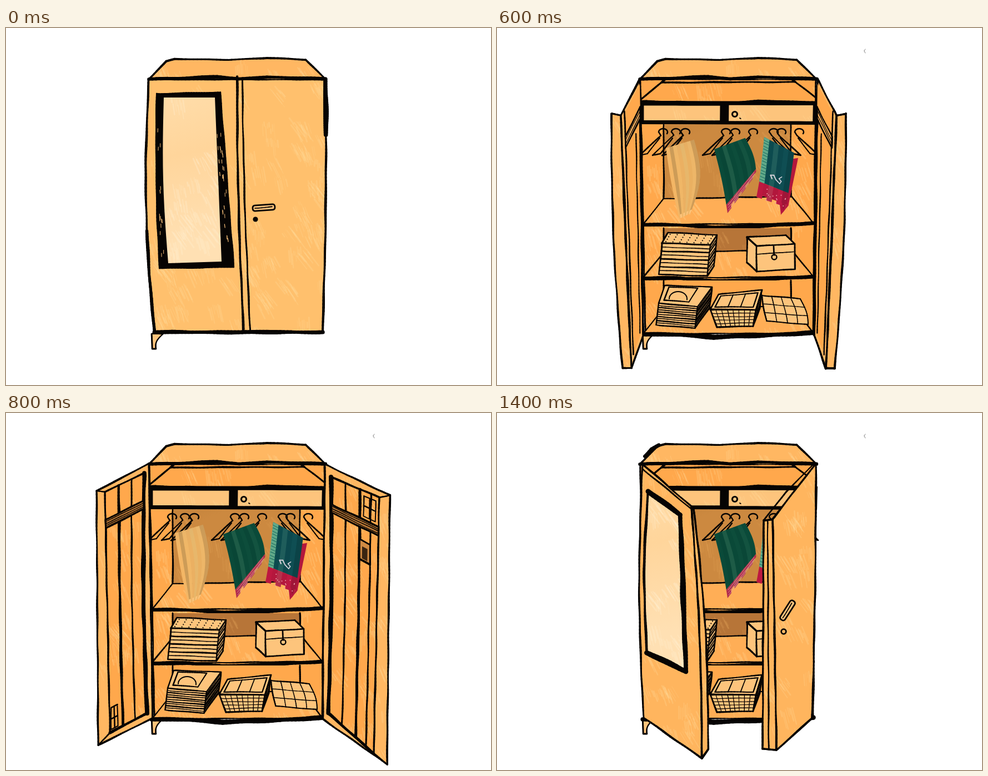
These frames come from a looping animation (873x642 px, 1500 ms). An HTML page with a canvas:

```html
<!DOCTYPE html>
<html>
<head>
<meta charset="utf-8">
<title>Wardrobe</title>
<style>
html, body { margin: 0; width: 100%; height: 100%; overflow: hidden; background: #fff; }
canvas { display: block; }
</style>
</head>
<body>
<canvas id="stage" width="873" height="642"></canvas>
<script>
const c = document.getElementById('stage').getContext('2d');
c.lineCap = c.lineJoin = 'round';
const BLACK = '#060403', PALE = '#fdc47c', WOOD = '#ffb762', INNER = '#ffa84c', BAR = '#b97735';

const mix = (a, b, t) => a + (b - a) * t;
const points = s => typeof s === 'string' ? s.split(' ').map(p => p.split(',').map(Number)) : s;

function random(seed) {
  return () => (seed = (seed * 16807 + 11) % 2147483647) / 2147483647;
}

// A four-cornered patch whose u = 0 and u = 1 sides bow sideways by l and r.
const quad = (s, l = 0, r = 0) => Object.assign(points(s), { l, r });
const flip = q => quad(q.map(([x, y]) => [834 - x, y]), -q.l || 0, -q.r || 0);

function at(q, u, v) {
  const [x, y] = [0, 1].map(k => mix(mix(q[0][k], q[1][k], u), mix(q[3][k], q[2][k], u), v));
  return [x + mix(q.l, q.r, u) * Math.sin(Math.PI * v), y];
}

const run = (q, u0, v0, u1, v1) =>
  Array.from({ length: 13 }, (_, i) => at(q, mix(u0, u1, i / 12), mix(v0, v1, i / 12)));
const rim = q => [...run(q, 0, 0, 1, 0), ...run(q, 1, 0, 1, 1), ...run(q, 1, 1, 0, 1), ...run(q, 0, 1, 0, 0)];
const inset = (q, u0, v0, u1, v1) => quad([at(q, u0, v0), at(q, u1, v0), at(q, u1, v1), at(q, u0, v1)]);

function trace(pts) {
  c.beginPath();
  points(pts).forEach(([x, y]) => c.lineTo(x, y));
  c.closePath();
}

function fill(color, pts) {
  trace(pts);
  c.fillStyle = color;
  c.fill();
}

// Hand-drawn line: slight wobble and changing pressure.
function ink(w, pts, color = BLACK) {
  const p = points(pts), seed = p[0][0] + p[0][1] * 3;
  const wave = k => (Math.sin(k * .09 + seed) + Math.sin(k * .037 + seed * 2)) / 2;
  let walked = 0, [px, py] = p[0];
  c.strokeStyle = color;
  for (let i = 1; i < p.length; i++) {
    const [ax, ay] = p[i - 1], [bx, by] = p[i], len = Math.hypot(bx - ax, by - ay);
    const n = Math.ceil(len / 7);
    for (let j = 1; j <= n; j++) {
      walked += len / n;
      const x = mix(ax, bx, j / n) + wave(walked) * .5, y = mix(ay, by, j / n) + wave(walked + 40) * .5;
      c.lineWidth = w * (1 + .2 * wave(walked * .8 + 9));
      c.beginPath();
      c.moveTo(px, py);
      c.lineTo(x, y);
      c.stroke();
      [px, py] = [x, y];
    }
  }
}

const rule = (q, u, w, v0 = 0, v1 = 1) => ink(w, run(q, u, v0, u, v1));

function shape(color, w, q) {
  fill(color, rim(q));
  ink(w, rim(q));
}

function grid(q, cols, rows, w) {
  for (let i = 1; i < cols; i++) rule(q, i / cols, w);
  for (let i = 1; i < rows; i++) ink(w, run(q, 0, i / rows, 1, i / rows));
}

function dot(x, y, r, color = BLACK) {
  c.beginPath();
  c.arc(x, y, r, 0, 7);
  c.fillStyle = color;
  c.fill();
}

function arc(x, y, rx, ry, from, to, w) {
  c.beginPath();
  c.ellipse(x, y, rx, ry, 0, from, to);
  c.lineWidth = w;
  c.strokeStyle = BLACK;
  c.stroke();
}

// Dry-brush patches, one for every 1500 square pixels.
function brush(pts, color = 'rgba(255,222,160,.24)') {
  const xs = pts.map(p => p[0]), ys = pts.map(p => p[1]);
  const x0 = Math.min(...xs), y0 = Math.min(...ys), w = Math.max(...xs) - x0, h = Math.max(...ys) - y0;
  const r = random(Math.round(x0 * 7 + y0 * 13));
  c.save();
  trace(pts);
  c.clip();
  c.strokeStyle = color;
  for (let i = 0; i < w * h / 1500; i++) {
    const x = x0 + r() * w, y = y0 + r() * h, slant = r() * .8;
    for (let j = 0; j < 8; j++) {
      const sx = x + j * 3, sy = y + r() * 14, len = 6 + r() * 24;
      c.lineWidth = .6 + r() * 2.4;
      c.beginPath();
      c.moveTo(sx, sy);
      c.lineTo(sx + len * slant, sy + len);
      c.stroke();
    }
  }
  c.restore();
}

function wood(color, w, q) {
  fill(color, rim(q));
  brush(rim(q));
  if (w) ink(w, rim(q));
}

function gradient(y0, y1, ...colors) {
  const g = c.createLinearGradient(0, y0, 60, y1);
  colors.forEach((s, i) => g.addColorStop(i / (colors.length - 1), s));
  return g;
}

function glass(q) {
  fill(gradient(120, 440, '#ffe0b0', '#ffd59b', '#ffe0b3'), rim(q));
  brush(rim(q), 'rgba(255,238,210,.3)');
}

function handle(x, y, angle) {
  c.save();
  c.translate(x, y);
  c.rotate(angle);
  c.beginPath();
  c.roundRect(-20, -5, 40, 10, 4);
  c.fillStyle = PALE;
  c.fill();
  c.lineWidth = 2.8;
  c.strokeStyle = BLACK;
  c.stroke();
  ink(1.8, '-16,0 15,-1');
  c.restore();
}

function feet() {
  const foot = quad('262,550 283,550 270,577 263,577', 0, -5);
  shape(PALE, 2.6, foot);
  shape(PALE, 2.6, flip(foot).map(([x, y]) => [x - 1, y - 7]));
}

function crown() {
  const pts = points('258,91 288,60 303,56 400,57 470,54 540,57 575,92');
  fill(WOOD, pts);
  brush(pts);
  ink(3.4, pts);
  ink(6, '257,92 380,88 420,92 470,88 575,92');
}

function closed() {
  const body = quad('257,92 575,92 570,547 267,547', -10, 3);
  feet();
  wood('#ffc06d', 4, body);
  crown();
  rule(body, 0, 5.5, .6);
  rule(body, 1, 8, 0, .22);
  ink(7, run(body, 0, 1, 1, 1));
  ink(4, run(body, .5, -.01, .53, 1));
  ink(3, run(body, .53, 0, .57, 1));

  const frame = quad('271,118 386,116 410,430 276,432', -3, 0);
  shape(BLACK, 2.5, frame);
  const r = random(77);
  for (let i = 0; i < 40; i++) {
    const v = .2 + r() * .75, u = i % 3 ? .9 + r() * .08 : .02 + r() * .05;
    ink(1, [at(frame, u, v), at(frame, u, v + .02)], PALE);
  }
  glass(quad('284,125 376,125 388,420 292,423', -5, 0));
  handle(464, 323, -.07);
  dot(449, 344, 4.6);
}

// The hanger's neck, with one arm swinging towards the nearer side.
function hanger(x) {
  const side = x < 480 ? -1 : 1;
  arc(x + 4, 187, 8, 6, Math.PI, 6.8, 2.5);
  ink(2.4, [[x - 4, 187], [x, 193], [x + side * 38, 229], [x + side * 24, 226], [x + side * 2, 198]]);
}

// Pleats end alternately long and short; the border is the part below hem.
function cloth(q, color, hem, border, n = 8) {
  const r = random(Math.round(q[0][0]));
  for (let i = 0; i < n; i++) {
    const u = i / n, end = i % 2 ? .95 : 1;
    const strip = (v0, v1) => [...run(q, u, v0, u, v1), ...run(q, u + 1.1 / n, v1, u + 1.1 / n, v0)];
    const shade = `rgba(${i % 2 ? '0,15,15' : '140,190,150'},${r() * .16})`;
    fill(color, strip(0, hem));
    fill(border, strip(hem, end));
    fill(shade, strip(0, end));
  }
}

function cloths() {
  cloth(quad('304,216 354,201 348,333 328,343', -2, 14), gradient(195, 344, '#d6a25f', '#e4b26b', '#f3b665'), 1, PALE);

  const green = quad('391,218 446,198 466,263 415,333', 2, 5);
  cloth(green, '#0a4a39', .87, '#b12b4d');
  for (let v = .9; v < 1; v += .04) ink(.8, run(green, .05, v, .95, v), '#e0a0a0');

  cloth(quad('500,240 541,234 524,320 511,336'), '#b5173d', 1, '#b5173d', 4);
  const teal = quad('481,196 534,224 520,322 467,304', 2, 0);
  cloth(teal, '#0d4d52', .74, '#bd1840', 6);
  fill('#61a989', inset(teal, 0, 0, .18, .74));
  for (let v = .05; v < .74; v += .05) ink(.8, run(teal, 0, v, .18, v), '#1b6d61');
  ink(1.8, '495,271 492,265 498,265 502,273 509,280 512,276 508,271 513,268', '#d9d4dc');
  const r = random(31);
  for (let i = 0; i < 14; i++) dot(...at(teal, .3 + r() * .7, .8 + r() * .2), 1, '#e99aa5');
}

// A solid drawn from its top face; side lists the corners of the visible edges.
function block(top, drop, layers, side, lean, w) {
  const lower = (i, d) => [top[i][0] - d * lean, top[i][1] + d];
  for (let i = 0; i < 4; i++) {
    const j = (i + 1) % 4;
    fill(PALE, [top[i], top[j], lower(j, drop), lower(i, drop)]);
  }
  shape(PALE, w, top);
  for (let k = 1; k <= layers; k++) {
    ink(k % 2 && k < layers ? w * .65 : w, side.map(i => lower(i, drop * k / layers)));
  }
  side.forEach(i => ink(w, [top[i], lower(i, drop)]));
}

function belongings() {
  const clothes = quad('308,368 396,372 384,390 297,387');
  block(clothes, 56, 8, [3, 2, 1], .1, 2.5);
  for (let i = 0; i < 28; i++) dot(...at(clothes, .06 + i % 7 * .145, .15 + Math.floor(i / 7) * .23), 1.1);

  block(quad('450,376 520,373 536,388 467,392'), 46, 1, [0, 3, 2], 0, 2.7);
  ink(1.8, '468,407 496,405 534,402');
  ink(3, '498,392 499,408');
  arc(499, 412, 4.5, 4.5, 0, 7, 2.4);

  const papers = quad('302,463 387,466 361,501 291,495');
  block(papers, 39, 10, [3, 2, 1], .12, 2.3);
  shape(PALE, 2.2, inset(papers, .1, .08, .72, .8));
  arc(326, 487, 16, 13, Math.PI, 6.4, 2);

  const rimTop = quad('399,479 477,471 466,507 384,506'), front = quad('384,507 466,507 461,536 396,538');
  const end = quad('466,507 477,472 473,504 461,536');
  [rimTop, front, end].forEach(q => shape(PALE, 2.6, q));
  ink(2, rim(inset(rimTop, .08, .13, .92, .85)));
  grid(inset(rimTop, .08, .13, .92, .85), 3, 1, 1.7);
  grid(front, 8, 5, 1.2);
  grid(end, 2, 5, 1.2);

  const bundle = quad('477,481 546,487 560,533 485,527', -1, 4);
  shape(PALE, 2.2, bundle);
  grid(bundle, 4, 3, 1.4);
}

function shelf(y, w) {
  const top = quad([[300, y - 47], [531, y - 51], [569, y - 3], [262, y]]);
  wood('#ffae56', 2.5, top);
  ink(w, [[262, y], [330, y], [390, y + 5], [480, y + 2], [569, y - 3]]);
}

function interior() {
  const body = quad('258,92 574,92 569,548 267,549');
  feet();
  wood(INNER, 3, body);
  crown();

  const ceiling = quad('296,98 537,97 575,126 259,128');
  ink(3.2, run(ceiling, 0, 0, 1, 0));
  [0, 1].forEach(u => {
    rule(ceiling, u, 3);
    ink(4, [at(ceiling, u, 0), at(ceiling, u, -.2)]);
  });

  const backs = [gradient(180, 320, '#d59b4f', '#be7f38', '#cc8940'), '#b77538', INNER];
  backs.forEach((color, i) => {
    const top = [174, 360, 454][i], y = [354, 450, 551][i];
    const back = quad([[300, top], [529, top], [529, y - 50], [300, y - 46]]);
    fill(color, back);
    brush(back, 'rgba(240,182,100,.16)');
    [0, 1].forEach(u => rule(back, u, 2.8));
    shelf(y, i < 2 ? 6.5 : 8);
  });

  const drawers = quad('258,131 577,132 576,174 258,173');
  fill(BLACK, drawers);
  ink(6, '262,133 330,134 400,139 470,132 574,134');
  wood(PALE, 0, inset(drawers, .02, .2, .45, .83));
  wood(PALE, 0, inset(drawers, .5, .17, .975, .85));
  arc(428, 155, 4.5, 4.5, 0, 7, 3.2);
  ink(2, '437,162 439,163');

  [295, 318, 335, 408, 425, 457, 494, 508, 540].forEach(hanger);
  cloths();
  belongings();
  ink(.8, '663,38 661,41 663,45', '#666');
}

function ajar() {
  interior();
  const left = quad('262,92 350,168 369,621 264,548', -7, 5);
  const right = quad('496,191 574,91 567,549 503,606', 0, 2);
  const leftEdge = quad('350,168 354,173 380,605 369,621', 5, 8);
  const rightEdge = quad('480,193 496,191 503,606 478,604');
  [left, right, leftEdge, rightEdge].forEach(q => wood('#ffb55e', 3.4, q));
  rule(rightEdge, .45, 2.6);
  ink(2.6, run(left, 0, .018, 1, .012));
  ink(2.6, '571,91 520,142 480,193');
  ink(6, '266,78 278,65 291,58');

  const mirror = quad('272,141 330,183 340,465 270,431', -6, 0);
  glass(mirror);
  ink(4.5, rim(mirror));
  ink(9, [...run(mirror, 0, 0, 1, 0), ...run(mirror, 1, 0, 1, 1), ...run(mirror, 1, 1, 0, 1)]);

  handle(523, 355, -1);
  arc(516, 393, 4.3, 4.3, 0, 7, 2.8);
}

function open() {
  interior();
  const edge = quad('206,154 223,157 242,612 226,612', -6, -1);
  const panel = quad('223,157 257,91 263,552 242,612');
  [q => q, flip].forEach(turn => {
    const leaf = turn(panel);
    wood(WOOD, 3.4, turn(edge));
    wood(WOOD, 3.4, leaf);
    fill(INNER, inset(leaf, .18, .02, 1, .97));
    rule(leaf, .18, 2.6, .01, .97);
    rule(leaf, .75, 2.2, .18, .96);
    rule(leaf, 1, 4.2, .15);
    const bar = inset(leaf, .18, .11, 1, .155);
    shape(WOOD, 2.6, bar);
    grid(bar, 1, 3, 1.2);
  });
}

function wide() {
  interior();
  // Hinge side first, so both leaves share the same layout.
  const left = quad('257,91 163,140 166,597 264,549');
  const right = quad('574,92 691,148 686,632 570,550');
  const panels = [quad('249,108 178,142 187,575 254,540', -4, 0), quad('585,115 672,152 662,612 580,540', 3, 0)];
  const planks = [[.32, .65], [.3, .6, .83]];
  [left, right].forEach((leaf, i) => {
    const panel = panels[i];
    wood(WOOD, 3.3, leaf);
    wood(INNER, 3.3, panel);
    [1, 2].forEach(k => ink(2.6, [leaf[k], panel[k]]));
    rule(panel, 0, 7);
    ink(5, run(panel, 0, 1, 1, 1));
    planks[i].forEach((u, k) => rule(panel, u, k === 1 ? 4.8 : 3));
    const bar = inset(panel, 0, .115, 1, .15);
    shape(BAR, 3.2, bar);
    grid(bar, 1, 4, 1.4);
  });
  const latches = [inset(panels[0], .78, .9, .96, .99), inset(panels[1], .68, .02, .93, .1)];
  latches.forEach(q => {
    ink(2, rim(q));
    grid(q, 2, 2, 2.4);
  });
  const picture = inset(panels[1], .6, .2, .83, .28);
  shape('#d08b43', 3, picture);
  fill('#3a2512', inset(picture, .25, .3, .75, .9));
}

const steps = [[500, closed], [600, ajar], [800, open], [1300, wide], [1400, open], [1500, ajar]];
let shown;

function tick() {
  const t = performance.now() % 1500;
  const pose = steps.find(s => t < s[0])[1];
  if (pose !== shown) {
    c.fillStyle = '#fff';
    c.fillRect(0, 0, 873, 642);
    pose();
    shown = pose;
  }
  requestAnimationFrame(tick);
}
tick();
</script>
</body>
</html>
```
